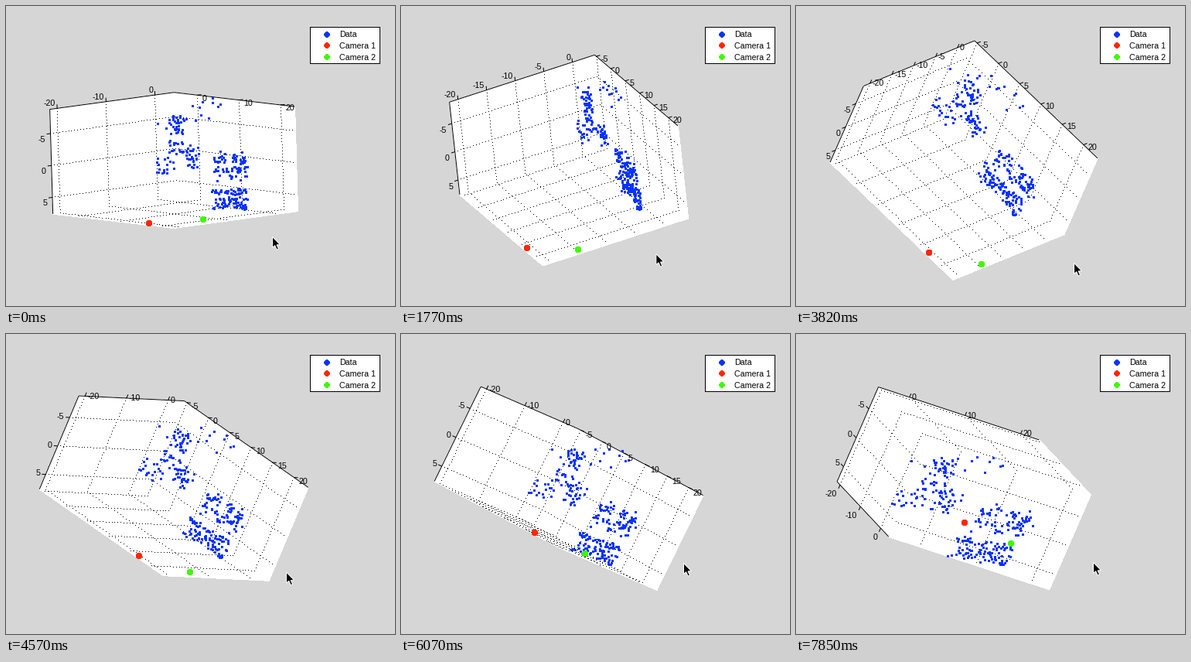
A matplotlib script that plays this animation: 503 px wide and 388 px high, repeating every 8000 ms.

```python
import numpy as np
import matplotlib.pyplot as plt
from matplotlib.animation import FuncAnimation
from matplotlib.collections import LineCollection, PolyCollection
from matplotlib.patches import Polygon, Rectangle

W, H, DPI = 503, 388, 100
PX = 72 / DPI
TICK, LOOP = 50, 8000
STEP = 148                  # the view is refreshed this often, in ms
STILL = (2, 13, 34, 35, 36, 47)     # refreshes during which the mouse rests
GREY, BLUE, RED, GREEN = "#d6d6d6", "#0433ff", "#ff2600", "#40f800"

SCALE = 8.32
CENTER = np.array([216.5, 199.0])
HALF = np.array([12.7, 14.45, 8.2])     # half the box along x (reversed), y, z
SIGN = np.array([-1, 1, 1])
SHIFT = np.array([-8.8, -8.85, 0.6])    # data value -> box coordinate

# moves made, azimuth, elevation, roll, pointer x, pointer y
POSES = np.array([
    (0, 40.3, 7.2, 1.7, 344, 298),
    (6, 29.7, 15.0, 3.4, 333, 307),
    (17, 16.6, 43.4, 9.9, 325, 336),
    (20, 30.0, 50.0, -2.0, 336, 342),
    (24, 59.3, 37.8, -23.7, 359, 332),
    (32, 48.5, 3.3, -22.3, 364, 293),
    (34, 48.0, -3.0, -23.0, 365, 289),
    (40, 52.7, 12.8, -32.3, 365, 310),
    (47, 64.9, -11.6, -23.6, 384, 295),
])
CAMERAS = [((12.35, 8.25, 7.95), RED), ((6.4, 14.25, 7.45), GREEN)]
ARROW = np.array([(0, 0), (0, 14), (3.2, 11.2), (5.6, 16.6), (8, 15.6),
                  (5.6, 10.4), (10, 10.2)])


def view(az, el, roll):
    """Rows: screen right, screen down, towards the viewer."""
    az, el, roll = np.radians([az, el, roll])
    sa, ca, se, ce = np.sin(az), np.cos(az), np.sin(el), np.cos(el)
    side = np.array([-ca, sa, 0])
    down = np.array([se * sa, se * ca, ce])
    sr, cr = np.sin(roll), np.cos(roll)
    return np.array([cr * side + sr * down, cr * down - sr * side,
                     [ce * sa, ce * ca, -se]])


def project(rot, pts):
    return CENTER + SCALE * np.asarray(pts, float) @ rot[:2].T


def make_cloud():
    """Points near a slanted plane, laid out as seen in the opening view."""
    rng = np.random.default_rng(7)
    parts = []

    def patch(n, x, y, rx, ry, depth=0.0):
        spread = rng.uniform(-1, 1, (n, 2)) * (rx, ry)
        parts.append(np.column_stack([spread + (x, y), rng.normal(depth, 0.8, n)]))

    for y in (143, 152, 161, 176, 187):             # narrow column
        patch(10, 220, y, 9, 4, max(0, (y - 143) / 22))
    for y in (191, 199, 210, 221, 239, 250, 258):   # wide rows
        patch(29 if y != 191 and y != 221 else 10, 290, y, 22, 4)
    patch(12, 276, 239, 11, 3)
    patch(26, 241, 195, 9, 14)
    patch(18, 206, 205, 12, 11, 4)
    patch(12, 258, 137, 32, 20, -6)                 # sparse points in front
    patch(4, 216, 150, 22, 32, 0)

    seen = np.vstack(parts)
    rot = view(*POSES[0, 1:4])
    flat = (seen[:, :2] - CENTER) / SCALE @ rot[:2]
    normal = np.array([1, -0.1356, 0.165])
    t = (-7.83 - flat @ normal) / (rot[2] @ normal) + seen[:, 2]
    return flat + t[:, None] * rot[2]


def ticks(axis, step):
    vals = np.arange(-30, 31, step)
    pos = SIGN[axis] * vals + SHIFT[axis]
    keep = np.abs(pos) <= HALF[axis]
    return list(zip(vals[keep], pos[keep]))


fig = plt.figure(figsize=(W / DPI, H / DPI), dpi=DPI, facecolor=GREY)
ax = fig.add_axes([0, 0, 1, 1])
ax.set_xlim(-0.5, W - 0.5)
ax.set_ylim(H - 0.5, -0.5)
ax.axis("off")

cloud = make_cloud()
live = []


def put(artist):
    live.append(artist)
    return artist


def dots(xy, color, size, marker, z):
    xy = np.atleast_2d(xy)
    return ax.plot(xy[:, 0], xy[:, 1], marker, color=color, ms=size * PX, mew=0,
                   zorder=z)[0]


def dotted(segs):
    """One-pixel dots, every fourth pixel along the longer direction."""
    pts = []
    for a, b in segs:
        n = int(np.abs(b - a).max() / 4) + 1
        pts.append(a + (b - a) * (np.arange(n) / n)[:, None])
    xy = np.round(np.vstack(pts))
    put(ax.plot(xy[:, 0], xy[:, 1], ",", color="black", zorder=2)[0])


def label(x, y, text, ha):
    return ax.text(x, y, text, ha=ha, va="center_baseline", fontsize=10.6 * PX,
                   family="Liberation Sans", zorder=6)


def draw_legend():
    for inset, color in ((0, "black"), (1, "white")):
        ax.add_patch(Rectangle((392.5 + inset, 26.5 + inset), 91 - 2 * inset,
                               48 - 2 * inset, fc=color, lw=0, zorder=5))
    for i, (text, color) in enumerate([("Data", BLUE), ("Camera 1", RED),
                                       ("Camera 2", GREEN)]):
        y = 36 + 14.5 * i
        dots((414.5, y), color, 7.8, "8", 6)
        label(431, y, text, "left")


def tick_steps(rot, below):
    reach = np.abs(rot[:2]).sum(axis=0) * 2 * HALF * SCALE
    return [10 if i < 2 and (below or reach[i] < 195) else 5 for i in range(3)]


def draw_box(rot, below):
    back = -np.sign(rot[2]) * HALF
    steps = tick_steps(rot, below)

    quads, grid = [], []
    for i in range(3):
        j, k = [a for a in range(3) if a != i]
        quad = np.tile(back, (4, 1))
        quad[:, j] = HALF[j] * np.array([-1, 1, 1, -1])
        quad[:, k] = HALF[k] * np.array([-1, -1, 1, 1])
        quads.append(project(rot, quad))
        for _, pos in ticks(i, steps[i]):
            for along in (j, k):
                seg = np.tile(back, (2, 1))
                seg[:, i] = pos
                seg[:, along] = -HALF[along], HALF[along]
                grid.append(project(rot, seg))
    put(ax.add_collection(PolyCollection(quads, facecolors="white", edgecolors="white",
                                         linewidths=0.3, antialiaseds=False, zorder=1)))
    dotted(grid)

    # per axis: signs of the edge it runs on, tick direction
    if below:
        rails = [((0, -1, 1), (0, 0, 1)), ((1, 0, -1), (0, 0, -1))]
    else:
        rails = [((0, -1, -1), (0, 0, -1)), ((-1, 0, -1), (-1, 0, 0))]
    rails.append(((1, -1, 0), (1, 0, 0)))

    black = []
    for i, (edge, way) in enumerate(rails):
        base = np.array(edge) * HALF
        ends = np.tile(base, (2, 1))
        ends[:, i] = -HALF[i], HALF[i]
        black.append(project(rot, ends))
        out = rot[:2] @ np.array(way)
        out = 5 * out / np.hypot(*out)
        for val, pos in ticks(i, steps[i]):
            point = base.copy()
            point[i] = pos
            p = project(rot, point)
            black.append([p, p + out])
            x, y = p + out
            if out[0] < 0:
                put(label(x - 2, y + (6 if out[1] > 0 else -2), str(val), "right"))
            else:
                put(label(x + 1, y + 4, str(val), "left"))
    put(ax.add_collection(LineCollection(black, colors="black", linewidths=PX, zorder=3)))


def draw(frame):
    while live:
        live.pop().remove()
    step = min((frame * TICK + 60) // STEP, 53)
    moves = step - sum(s <= step for s in STILL)
    az, el, roll, mx, my = [np.interp(moves, POSES[:, 0], col)
                            for col in POSES[:, 1:].T]
    rot = view(az, el, roll)
    draw_box(rot, el < 0)
    put(dots(np.round(project(rot, cloud)), BLUE, 3, "s", 4))
    for pos, color in CAMERAS:
        put(dots(project(rot, pos), color, 8.2, "8", 4.5))
    put(ax.add_patch(Polygon(ARROW + (mx, my), fc="black", ec="white", lw=PX, zorder=8)))
    return live


draw_legend()
anim = FuncAnimation(fig, draw, frames=LOOP // TICK, interval=TICK,
                     init_func=lambda: draw(0), repeat=True, repeat_delay=0,
                     blit=False, cache_frame_data=False)
plt.show()
```
